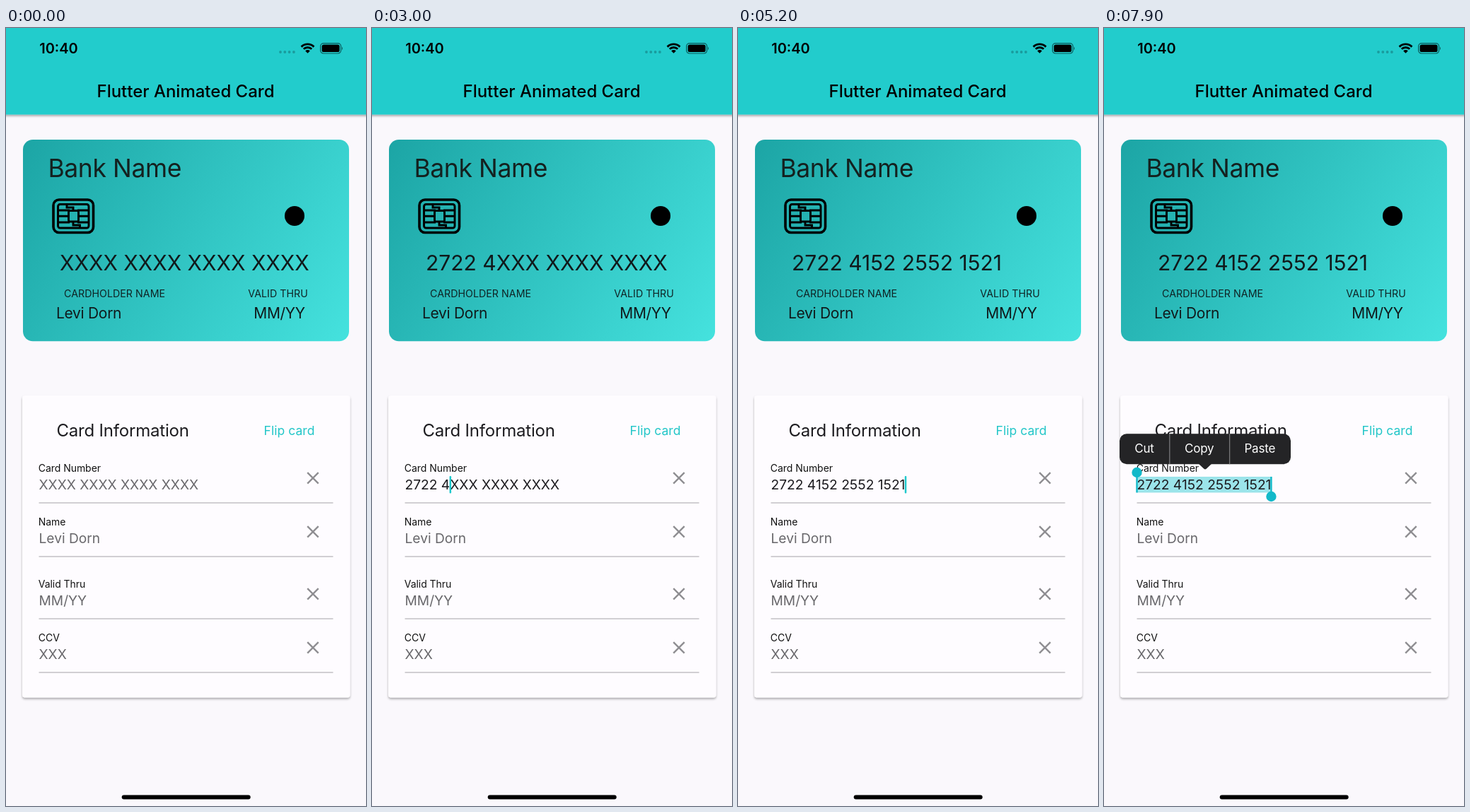
Write an HTML page that moves like this. It is 509 by 1101 pixels and loops after 8000 ms.

```html
<!DOCTYPE html>
<html lang="en">
<head>
<meta charset="utf-8">
<title>Animated card form</title>
<style>
  html, body { margin: 0; width: 100%; height: 100%; overflow: hidden; background: #faf8fc; }
  svg { display: block; width: 509px; height: 1101px; }
  text { font-family: Inter, "Liberation Sans", sans-serif; fill: #1c1b1f; }
  .mid { text-anchor: middle; }
  .big { font-size: 35.5px; letter-spacing: -.4px; fill: #14211f; }
  .num { font-size: 30px; font-variant-ligatures: no-contextual; fill: #10191b; }
  .tag { font-size: 14.2px; letter-spacing: .05px; fill: #0f2425; }
  .own { font-size: 21px; letter-spacing: -.3px; fill: #10191b; }
  .label { font-size: 14px; letter-spacing: -.05px; fill: #111; }
  .value { font-size: 19.2px; font-variant-ligatures: no-contextual; }
  .hint { fill: #68676b; }
  .menu { font-size: 17px; letter-spacing: -.2px; fill: #fff; text-anchor: middle; }
</style>
</head>
<body>
<svg viewBox="0 0 509 1101">
  <defs>
    <linearGradient id="teal" gradientUnits="userSpaceOnUse" x1="24" y1="158" x2="485" y2="443">
      <stop offset="0" stop-color="#1ca5a5"/>
      <stop offset="1" stop-color="#45e2de"/>
    </linearGradient>
    <filter id="shade" filterUnits="userSpaceOnUse" x="-20" y="-20" width="549" height="1000">
      <feDropShadow dx="0" dy="2.2" stdDeviation="1.6" flood-color="#000" flood-opacity=".32"/>
    </filter>
  </defs>
  <rect width="509" height="1101" fill="#faf8fc"/>

  <rect x="-10" y="-10" width="529" height="132.5" fill="#22cccc" filter="url(#shade)"/>
  <text class="mid" x="74.5" y="36" font-size="20" font-weight="600" style="fill:#000">10:40</text>
  <g fill="#1a9b9d">
    <circle cx="388" cy="34" r="1.9"/><circle cx="394.3" cy="34" r="1.9"/>
    <circle cx="400.6" cy="34" r="1.9"/><circle cx="406.9" cy="34" r="1.9"/>
  </g>
  <g fill="none" stroke="#000" stroke-width="2.9">
    <path d="M417.6 26.6A12.6 12.6 0 0 1 435.4 26.6"/>
    <path d="M420.8 29.8A8.1 8.1 0 0 1 432.2 29.8"/>
    <path d="M426.5 35.8L423.2 32.4A4.7 4.7 0 0 1 429.8 32.4Z" fill="#000" stroke="none"/>
  </g>
  <rect x="444.6" y="21.6" width="29" height="14.4" rx="4.4" fill="none" stroke="#0b5a5b" stroke-width="1.2"/>
  <rect x="446.6" y="23.5" width="25" height="10.6" rx="2.7"/>
  <path d="M475 26.4Q477 28.8 475 31.2Z" fill="#0b5a5b"/>
  <text class="mid" x="254" y="98" font-size="24" font-weight="500" style="fill:#000">Flutter Animated Card</text>

  <rect x="24" y="158" width="461" height="285.3" rx="14" fill="url(#teal)"/>
  <text class="big" x="59.5" y="211">Bank Name</text>
  <g fill="none" stroke="#000" stroke-width="2.9">
    <rect x="67" y="243" width="56.5" height="46.5" rx="8" stroke-width="3.6"/>
    <rect x="73.5" y="249.5" width="43.5" height="33.5" rx="3"/>
    <rect x="88.5" y="258.5" width="14" height="15.5" rx="2"/>
    <path d="M74 258H90M74 266.3H88M74 275H90M117 258H101M117 266.3H103M117 275H101M86 250V254H95V258M104.5 283V279H95V275"/>
  </g>
  <circle cx="408" cy="266" r="14"/>
  <text class="num" id="cardNo" x="76" y="343"></text>
  <text class="tag" x="82" y="381">CARDHOLDER NAME</text>
  <text class="tag" x="342.3" y="381">VALID THRU</text>
  <text class="own" x="71" y="411">Levi Dorn</text>
  <text class="own mid" x="386.5" y="411">MM/YY</text>

  <rect x="23" y="520" width="463.5" height="427.5" rx="4" fill="#fefcff" filter="url(#shade)"/>
  <text x="71.5" y="578" font-size="24" letter-spacing="-.2">Card Information</text>
  <text x="364.5" y="576" font-size="17.5" letter-spacing=".05" style="fill:#22c6c8">Flip card</text>
  <rect id="sel" y="635" height="22.5" fill="#9be4ea"/>
  <g id="rows"></g>
  <text class="value" id="field" x="46.5" y="653"></text>
  <rect id="caret" y="634" width="2.5" height="24.5" rx="1" fill="#1fc8cc"/>
  <g id="grips" fill="#12b9c9">
    <rect x="45.3" y="634" width="2.4" height="23.5"/>
    <circle cx="46.5" cy="629" r="7.2"/>
    <g id="gripEnd">
      <rect x="-1.2" y="635" width="2.4" height="23.5"/>
      <circle cy="663" r="7.2"/>
    </g>
  </g>
  <g id="menu">
    <path d="M133 616H153L145 623.5Q143 625.5 141 623.5Z" fill="#242426"/>
    <rect x="22" y="574.3" width="242" height="43" rx="10" fill="#242426"/>
    <path d="M92.8 574.3V617.3M177.6 574.3V617.3" stroke="#77777a" stroke-width="1.3"/>
    <text class="menu" x="57" y="601">Cut</text>
    <text class="menu" x="134.7" y="601">Copy</text>
    <text class="menu" x="220.3" y="601">Paste</text>
  </g>
  <rect x="163.7" y="1085.5" width="182" height="6" rx="3"/>
</svg>
<script>
const $ = id => document.getElementById(id);
const LOOP = 8000, LEFT = 46.5, MASK = 'XXXX XXXX XXXX XXXX';

// Form rows: baseline of the label, label, hint
const rows = [
  [627, 'Card Number', MASK],
  [703, 'Name', 'Levi Dorn'],
  [791, 'Valid Thru', 'MM/YY'],
  [867, 'CCV', 'XXX']
];
$('rows').innerHTML = rows.map(([y, label, hint], i) => `
  <text class="label" x="45.8" y="${y + .5}">${label}</text>
  <text class="value hint" id="hint${i}" x="${LEFT}" y="${y + 26}">${hint}</text>
  <path d="M46.5 ${y + 45}H462.5" stroke="#c2c0c4" stroke-width="1.5"/>
  <path d="M426.2 ${y + 2.2}l15.5 15.5m0 -15.5l-15.5 15.5" stroke="#8f8e92" stroke-width="2.4"/>`).join('');

// Number typed so far, with one correction on the way
const typing = [
  [0, ''], [1500, '2'], [2400, '27'], [2700, '272'], [2900, '2722'],
  [3000, '2722 4'], [3300, '2722 41'], [3600, '2722 415'], [3800, '2722 4152'],
  [4000, '2722 4152 1'], [4200, '2722 4152'], [4300, '2722 4152 2'],
  [4400, '2722 4152 25'], [4600, '2722 4152 255'], [4700, '2722 4152 2552'],
  [4800, '2722 4152 2552 1'], [4900, '2722 4152 2552 15'],
  [5000, '2722 4152 2552 152'], [5200, '2722 4152 2552 1521']
];
const caretFade = [[800, 0], [1000, 1], [5700, 1], [6100, 0], [6200, 0], [6500, 1], [7000, 1], [7300, 0]];
const hintFade = [[1400, 1], [1500, .75], [1700, 0]];
const menuFade = [[7500, 0], [7800, 1]];

function ramp(keys, t) {
  let [t0, v0] = keys[0];
  for (const [t1, v1] of keys) {
    if (t < t1) return t <= t0 ? v0 : v0 + (v1 - v0) * (t - t0) / (t1 - t0);
    [t0, v0] = [t1, v1];
  }
  return v0;
}

function draw(t) {
  const typed = typing.filter(k => k[0] <= t).pop()[1];
  const shown = typed + MASK.slice(typed.length);
  const field = $('field');
  $('cardNo').textContent = shown;
  field.textContent = typed && shown;
  const end = LEFT + (typed ? field.getSubStringLength(0, typed.length) : 0);
  const selected = t >= 7600;

  $('hint0').setAttribute('opacity', ramp(hintFade, t));
  $('caret').setAttribute('x', end - .7);
  $('caret').setAttribute('opacity', ramp(caretFade, t));
  $('sel').setAttribute('x', LEFT);
  $('sel').setAttribute('width', selected ? end - LEFT : 0);
  $('gripEnd').setAttribute('transform', `translate(${end} 0)`);
  $('grips').setAttribute('opacity', selected ? 1 : 0);
  $('menu').setAttribute('opacity', ramp(menuFade, t));
}

const start = performance.now();
let last = -1;
function tick() {
  // The picture advances ten times a second
  const t = Math.floor(Math.max(0, performance.now() - start) % LOOP / 100) * 100;
  if (t !== last) draw(last = t);
  requestAnimationFrame(tick);
}
tick();
</script>
</body>
</html>
```
